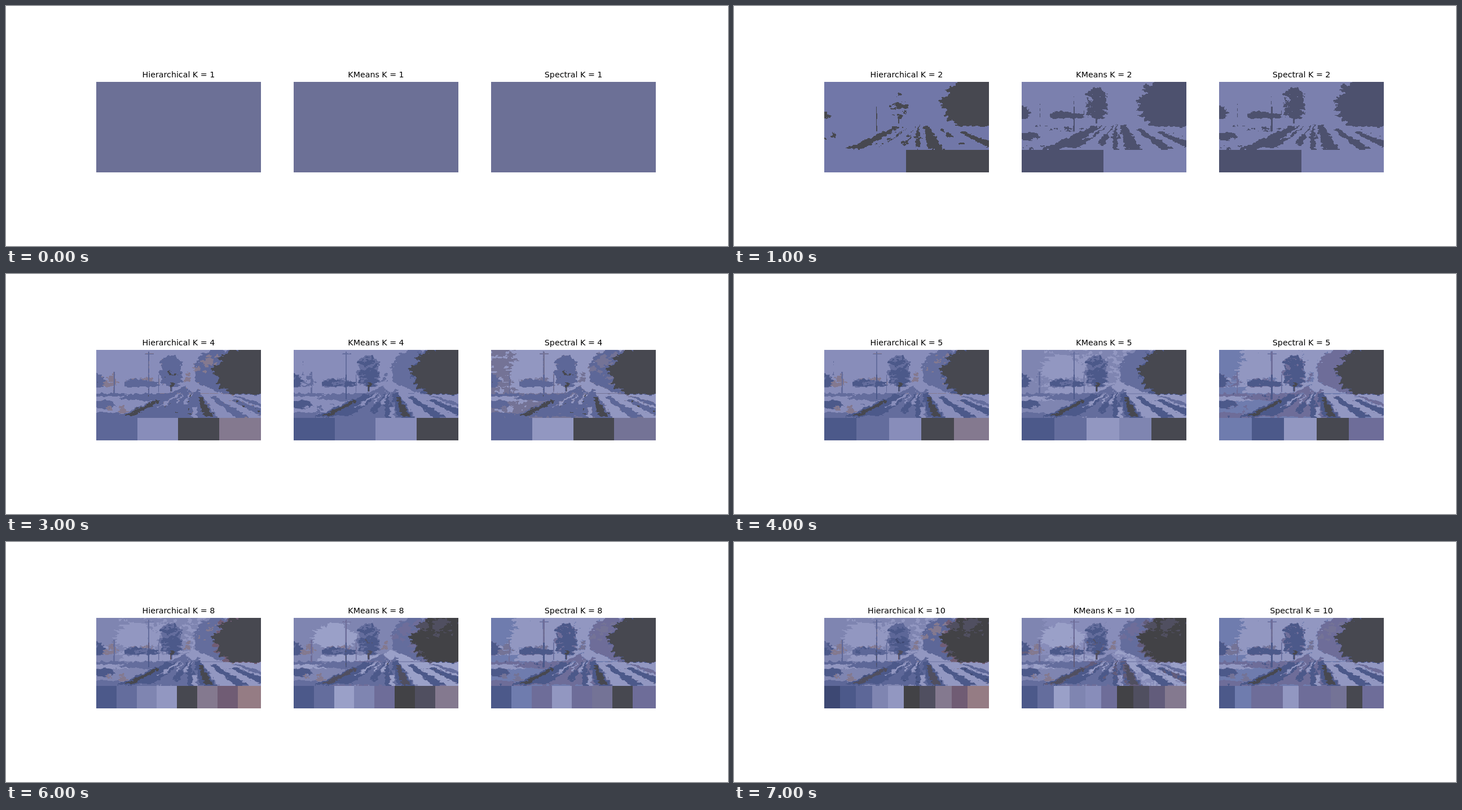
An HTML page with a canvas for the animation above (8000 ms loop, 1280x427 px).

```html
<!DOCTYPE html>
<html lang="en">
<head>
<meta charset="utf-8">
<title>Colour clustering</title>
<style>
  html, body { margin: 0; width: 100%; height: 100%; overflow: hidden; background: #fff; }
  canvas { display: block; }
</style>
</head>
<body>
<canvas id="stage" width="1280" height="427"></canvas>
<script>
// Picture size in its own pixels, with the swatches below it.
const W = 269, H = 111, SWATCH = 37, STEP = 1000;
const PANEL_W = 291.8, PANEL_H = 160.5, TOP = 135.2;
const SCALE = W / PANEL_W;

const inks = {
  a: '#6c7096', x: '#7177a8', y: '#4d516e', z: '#7b80ae',
  n: '#3d4873', b: '#4c598a', m: '#5d6798', M: '#646d9d', B: '#6f7cae',
  l: '#7f85b1', L: '#888dba', h: '#9297c1', H: '#9aa0c8',
  k: '#474850', K: '#424246', s: '#504f60', g: '#747396', v: '#6e6d99',
  q: '#625c7b', p: '#84798f', r: '#705c74', t: '#957c84'
};
// One word per step, one ink per cluster.
const methods = {
  Hierarchical: 'a xk mLk mLkp bMLkp bMLkpr bMlhkprt nbmlhKsprt',
  KMeans: 'a yz mLk bMLk bMhlk bMHlKs bMHlvKsp bMHlLvKsqp',
  Spectral: 'a yz mLk mhkg Bbhkv Bbhgkv bBvhvgkv bBvvhvvgkv'
};
const paint = {
  sky: '#888dba', skyShade: '#7c82ae', cloud: '#969bc5', haze: '#817c9e',
  bush: '#566290', backTree: '#636c9c', mauve: '#75709a', leaf: '#5a6595', leafShade: '#505d87',
  field: '#7883b2', snow: '#9297c2', patch: '#5e6898', road: '#646d9d',
  rut: '#505878', deepRut: '#484c5c', fringe: '#6c6078', pole: '#6a678c', poleFoot: '#535974'
};
const vanish = { x: 172, y: 58 }, bottom = 120;

let seed = 7;
const rand = (lo = 0, hi = 1) => {
  seed = (seed * 16807) % 2147483647;
  return lo + (hi - lo) * seed / 2147483647;
};

function makeCanvas(height) {
  const c = document.createElement('canvas');
  c.width = W; c.height = height;
  return c.getContext('2d', { willReadFrequently: true });
}

function hash(x, y) {
  const s = Math.sin(x * 127.1 + y * 311.7) * 43758.5453;
  return s - Math.floor(s);
}

// Smooth value noise in -1..1.
function noise(x, y) {
  const ix = Math.floor(x), iy = Math.floor(y);
  const ease = t => t * t * (3 - 2 * t);
  const u = ease(x - ix), v = ease(y - iy);
  const row = j => hash(ix, j) * (1 - u) + hash(ix + 1, j) * u;
  return 2 * (row(iy) * (1 - v) + row(iy + 1) * v) - 1;
}

const clamp = (v, max) => Math.max(0, Math.min(max, Math.round(v)));

// Areas are placed in stage pixels from the picture's top left corner.
function paintAreas(g) {
  const fill = (colour, points) => {
    g.fillStyle = colour;
    g.beginPath();
    points.forEach(p => g.lineTo(...p));
    g.fill();
  };
  const blob = (colour, x, y, rx, ry, spike = 0.2) => {
    const n = Math.round(12 + rx);
    fill(colour, Array.from({ length: n }, (_, i) => {
      const angle = i / n * 2 * Math.PI, r = 1 + rand(-spike, spike);
      return [x + rx * r * Math.cos(angle), y + ry * r * Math.sin(angle)];
    }));
  };
  const scatter = (colour, n, x, y, dx, dy, size) => {
    for (let i = 0; i < n; i++) {
      const r = size * rand(0.5, 1);
      blob(colour, x + rand(-dx, dx), y + rand(-dy, dy), r * 1.5, r, 0.3);
    }
  };
  // A band of ground running from the vanishing point to left..right at the bottom.
  const ray = (colour, left, right, near = 1, far = 0.1) => {
    const at = (x, t) => [vanish.x + t * (x - vanish.x), vanish.y + t * (bottom - vanish.y)];
    fill(colour, [at(left, far), at(right, far), at(right, near), at(left, near)]);
  };

  g.fillStyle = paint.sky;
  g.fillRect(0, 0, 300, 130);
  blob(paint.skyShade, 0, 14, 46, 36);
  blob(paint.cloud, 72, 34, 40, 22);
  scatter(paint.haze, 5, 30, 56, 14, 8, 5);
  scatter(paint.haze, 4, 78, 50, 22, 2, 5);
  scatter(paint.haze, 3, 160, 48, 5, 8, 4);

  blob(paint.bush, 3, 55, 11, 12, 0.1);
  blob(paint.rut, 2, 59, 9, 6);
  for (let x = 55; x <= 103; x += 8) blob(paint.bush, x, 61, 7, 8 + 2 * Math.sin(x / 9), 0.1);
  blob(paint.backTree, 214, 38, 39, 40, 0.09);
  scatter(paint.mauve, 9, 200, 30, 22, 24, 6);
  blob(paint.leaf, 134, 25, 18, 17, 0.18);
  blob(paint.leaf, 133, 48, 21, 20, 0.15);
  scatter(paint.leafShade, 12, 132, 42, 12, 22, 6);
  scatter(paint.rut, 9, 132, 50, 14, 11, 3.5);
  scatter(paint.deepRut, 2, 132, 62, 4, 1, 3);

  blob(paint.fringe, 292, 42, 85, 54, 0.12);
  blob('#48484f', 292, 42, 82, 52, 0.11);
  scatter(inks.s, 9, 250, 22, 30, 18, 7);
  blob(inks.K, 276, 54, 42, 26);

  fill(paint.field, [[0, 66], [150, 66], [vanish.x, vanish.y], [230, 80], [300, 80], [300, 130], [0, 130]]);
  fill(paint.snow, [[170, 56], [230, 80], [300, 80], [300, 130], [200, 130]]);
  fill(paint.snow, [[50, 67], [165, 65], [140, 77], [40, 77]]);
  blob(paint.snow, 30, 86, 46, 5);
  blob(paint.patch, 14, 80, 38, 2.5);
  blob(paint.patch, 92, 84, 50, 6);
  blob(paint.leafShade, 12, 97, 20, 8);
  blob(paint.patch, 12, 116, 34, 5);
  scatter(paint.haze, 4, 36, 106, 16, 5, 5);

  ray(paint.road, 35, 222);
  ray(paint.leafShade, 62, 100, 0.95, 0.4);
  for (let i = 0; i < 20; i++) {
    const x = rand(70, 180), far = rand(0.2, 0.7);
    ray([paint.leafShade, paint.snow, paint.rut][i % 3], x, x + rand(4, 12), far + rand(0.2, 0.4), far);
  }
  ray(paint.rut, 36, 66, 1, 0.35);
  ray(paint.deepRut, 46, 60, 0.95, 0.5);
  ray(paint.rut, 183, 213, 1, 0.3);
  ray(paint.deepRut, 193, 208, 1, 0.4);
  ray(paint.snow, 216, 242, 1, 0.25);
  ray(paint.leafShade, 245, 272, 1, 0.4);
  ray(paint.rut, 298, 328, 1, 0.5);
  ray(paint.patch, 345, 375, 1, 0.4);
  blob(paint.snow, 170, 66, 10, 8);
}

function paintPoles(g) {
  const bar = (colour, ...box) => {
    g.fillStyle = colour;
    g.fillRect(...box);
  };
  bar(paint.pole, 92, 3, 2.2, 40);
  bar(paint.poleFoot, 92, 43, 2.2, 45);
  bar(paint.pole, 86, 6, 16, 1.5);
  bar(paint.pole, 31, 39, 1.6, 40);
  bar(paint.pole, 28, 43, 8, 1);
  bar(paint.pole, 109.5, 43, 1.6, 32);
  bar(paint.pole, 108, 77.5, 122, 1);
  bar(paint.deepRut, 131.5, 62, 2.5, 12);
}

// Paints the landscape, then roughens its outlines and tones.
function paintScene() {
  const flat = makeCanvas(H), rough = makeCanvas(H);
  flat.scale(SCALE, SCALE);
  rough.scale(SCALE, SCALE);
  paintAreas(flat);
  const from = new Uint32Array(flat.getImageData(0, 0, W, H).data.buffer);
  const image = rough.createImageData(W, H);
  const to = new Uint32Array(image.data.buffer);
  for (let y = 0; y < H; y++) for (let x = 0; x < W; x++) {
    const dx = 3 * noise(x / 4, y / 2.5), dy = 1.6 * noise(x / 4 + 80, y / 3);
    to[y * W + x] = from[clamp(y + dy, H - 1) * W + clamp(x + dx, W - 1)];
  }
  rough.putImageData(image, 0, 0);
  paintPoles(rough);
  const { data } = rough.getImageData(0, 0, W, H);
  for (let i = 0; i < data.length; i += 4) {
    const x = i / 4 % W, y = Math.floor(i / 4 / W);
    const tone = 4 * noise(x / 8 + 20, y / 4) + 2 * noise(x / 2.5, y / 2 + 30);
    for (let c = 0; c < 3; c++) data[i + c] += tone;
  }
  return data;
}

// The scene in its nearest inks, above a row of equal swatches.
function quantise(scene, palette) {
  const out = makeCanvas(H + SWATCH), image = out.createImageData(W, H);
  const colours = palette.map(hex => [1, 3, 5].map(i => parseInt(hex.slice(i, i + 2), 16)));
  for (let i = 0; i < scene.length; i += 4) {
    let best = Infinity, pick;
    for (const c of colours) {
      const d = (scene[i] - c[0]) ** 2 + (scene[i + 1] - c[1]) ** 2 + (scene[i + 2] - c[2]) ** 2;
      if (d < best) { best = d; pick = c; }
    }
    image.data.set(pick, i);
    image.data[i + 3] = 255;
  }
  out.putImageData(image, 0, 0);
  const width = Math.floor(W / palette.length);
  palette.forEach((hex, i) => {
    out.fillStyle = hex;
    out.fillRect(i * width, H, W, SWATCH);
  });
  return out.canvas;
}

const scene = paintScene();
const panels = Object.entries(methods).map(([name, words], i) => ({
  name,
  x: 160 + 350.1 * i,
  steps: words.split(' ').map(word => ({
    count: word.length,
    picture: quantise(scene, [...word].map(letter => inks[letter]))
  }))
}));

const ctx = document.getElementById('stage').getContext('2d');
ctx.font = '14.22px "DejaVu Sans", sans-serif';
ctx.textAlign = 'center';
ctx.imageSmoothingEnabled = false;

function draw(step) {
  ctx.clearRect(0, 0, 1280, 427);
  for (const { name, x, steps } of panels) {
    const { count, picture } = steps[step];
    ctx.fillText(`${name} K = ${count}`, x + PANEL_W / 2, 127.2);
    ctx.drawImage(picture, x, TOP, PANEL_W, PANEL_H);
  }
}

let shown = -1;
function tick() {
  const step = Math.floor(performance.now() / STEP) % panels[0].steps.length;
  if (step !== shown) draw(shown = step);
  requestAnimationFrame(tick);
}
tick();
</script>
</body>
</html>
```
